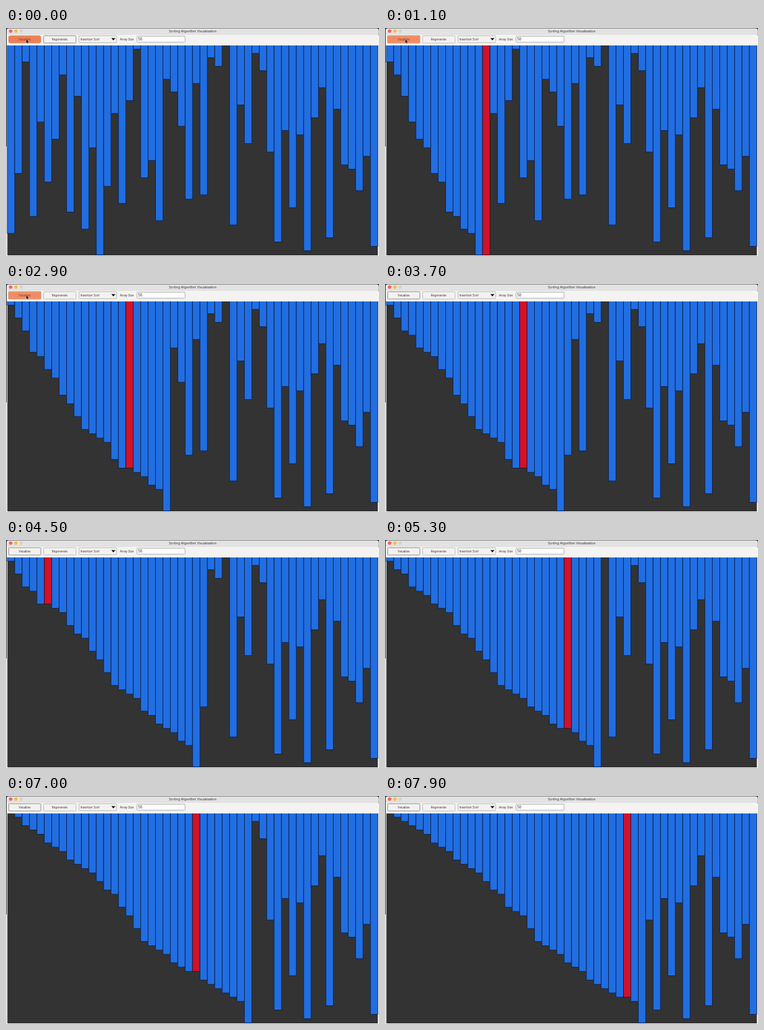
Recreate the animation shown at these times as an HTML page. Size 600 by 366 pixels, loop 8000 ms.

```html
<!DOCTYPE html>
<html lang="en">
<head>
<meta charset="utf-8">
<title>Sorting Algorithm Visualisation</title>
<style>
html, body { margin: 0; width: 100%; height: 100%; overflow: hidden; background: #fff; }
svg { display: block; width: 600px; height: 366px; }
text { font: 4.65px Inter, "Open Sans", sans-serif; fill: #303030; }
.bar { fill: #216ee2; stroke: #0b1d40; stroke-width: .85; }
.bar.active { fill: #d0122b; stroke: #3a0710; }
.field { fill: #fff; stroke: #9a9a9a; stroke-width: .8; }
.button { fill: #f3f2f0; stroke: #b0aeab; stroke-width: .8; }
</style>
</head>
<body>
<svg viewBox="0 0 600 366">
  <rect width="600" height="366" fill="#fafafa"/>
  <rect width="1" height="190" fill="#2a2a2a"/>
  <rect y="190" width="1" height="176" fill="#cfcac8"/>
  <rect x="2.2" y="27" width="596" height="338" fill="#333"/>
  <g id="bars"></g>

  <rect width="600" height="12" fill="#3a3a3a"/>
  <path d="M1 28V4Q1 .7 4.500 .7H596Q599.500 .7 599.500 4V28Z" fill="#f4f3f1"/>
  <path d="M1 10V4Q1 .7 4.500 .7H596Q599.500 .7 599.500 4V10Z" fill="#e4e3e4"/>
  <path d="M1 10.100H599.500" stroke="#c9c8c8" stroke-width=".6"/>
  <circle cx="7.500" cy="5" r="2.700" fill="#f9605a"/>
  <circle cx="16" cy="5" r="2.700" fill="#f9bd36"/>
  <circle cx="24.500" cy="5" r="2.700" fill="#d4d3d4"/>
  <text x="300.300" y="7" text-anchor="middle" style="font-size:5.300px">Sorting Algorithm Visualisation</text>

  <rect id="visualise" class="button" x="4.300" y="12.400" width="51.700" height="11.600" rx="1"/>
  <rect id="inner" x="5.300" y="13.400" width="49.700" height="9.600" rx="1" fill="none" stroke="#f6b08f" stroke-width=".6"/>
  <text id="label" x="30" y="20" text-anchor="middle">Visualise</text>
  <rect class="button" id="regenerate" x="60.600" y="12.400" width="52" height="11.600" rx="1"/>
  <text x="86.300" y="20" text-anchor="middle">Regenerate</text>
  <rect class="button" x="117.400" y="12.400" width="60.600" height="11" rx="1"/>
  <text x="119.500" y="19.500" style="font-size:4.850px">Insertion Sort</text>
  <path d="M169.500 16.300H176L172.750 20Z" fill="#111"/>
  <text x="183.300" y="20">Array Size</text>
  <rect class="field" x="210.800" y="13.200" width="77.200" height="9.600" rx="1"/>
  <text x="212.500" y="20.100" style="font-size:5.700px">50</text>
  <path id="cursor" d="M32.500 17.800V24.500L34 23.200L35 25.300L36.100 24.800L35.200 22.800H37.200Z" fill="#111" stroke="#eee" stroke-width=".4"/>
</svg>
<script>
const LOOP = 8000, STEP = 100, HOVER_END = 3700;
const LEFT = 2.1, PITCH = 11.92;
const values = [
  44, 30, 4, 40, 18, 32, 22, 7, 39, 12, 43, 24, 49, 33, 16, 37, 13, 1, 31, 27,
  41, 8, 11, 19, 36, 9, 35, 3, 5, 0, 42, 14, 23, 2, 6, 25, 46, 20, 38, 21,
  48, 17, 10, 45, 15, 28, 29, 34, 26, 47
];
// [time in ms, shifts done]
const pace = [[160, 0], [1100, 36], [1800, 70], [2900, 113], [4500, 185], [6100, 262], [7900, 346]];

const $ = id => document.getElementById(id);
const bars = values.map((_, i) => {
  const bar = document.createElementNS("http://www.w3.org/2000/svg", "rect");
  bar.setAttribute("x", LEFT + PITCH * i);
  bar.setAttribute("y", 20);
  bar.setAttribute("width", PITCH);
  return $("bars").appendChild(bar);
});

function shiftsAt(t) {
  if (t <= pace[0][0]) return 0;
  const k = pace.findIndex(p => t <= p[0]);
  const [t0, n0] = pace[k - 1], [t1, n1] = pace[k];
  return Math.round(n0 + (n1 - n0) * (t - t0) / (t1 - t0));
}

// Insertion sort, halted after the given number of shifts
function sortUntil(limit) {
  const list = values.slice();
  let done = 0;
  if (!limit) return { list, active: -1 };
  for (let i = 1; i < list.length; i++) {
    const key = list[i];
    let j = i - 1;
    for (; j >= 0 && list[j] > key; j--) {
      list[j + 1] = list[j];
      if (++done === limit) return { list, active: j + 1 };
    }
    list[j + 1] = key;
  }
  return { list, active: -1 };
}

function setButton(t) {
  const hover = t < HOVER_END, pressed = t < STEP;
  $("visualise").style.fill = pressed ? "#ee7f55" : hover ? "#f28a60" : "#f3f2f0";
  $("visualise").style.stroke = pressed ? "#d98361" : hover ? "#b5694a" : "#77787a";
  $("visualise").setAttribute("rx", pressed ? 2.5 : 1);
  $("inner").style.display = hover && !pressed ? "" : "none";
  $("regenerate").style.stroke = pressed ? "#77787a" : "#b5b3b0";
  $("label").style.fill = hover ? "#7a3b22" : "#303030";
  $("cursor").style.display = hover ? "" : "none";
}

function render(ms) {
  const t = Math.floor(ms % LOOP / STEP) * STEP;
  const { list, active } = sortUntil(shiftsAt(t));
  bars.forEach((bar, i) => {
    bar.setAttribute("height", 7.1 + 6.88 * list[i]);
    bar.setAttribute("class", i === active ? "bar active" : "bar");
  });
  setButton(t);
}

const start = performance.now();
function tick() {
  render(performance.now() - start);
  requestAnimationFrame(tick);
}
tick();
</script>
</body>
</html>
```
